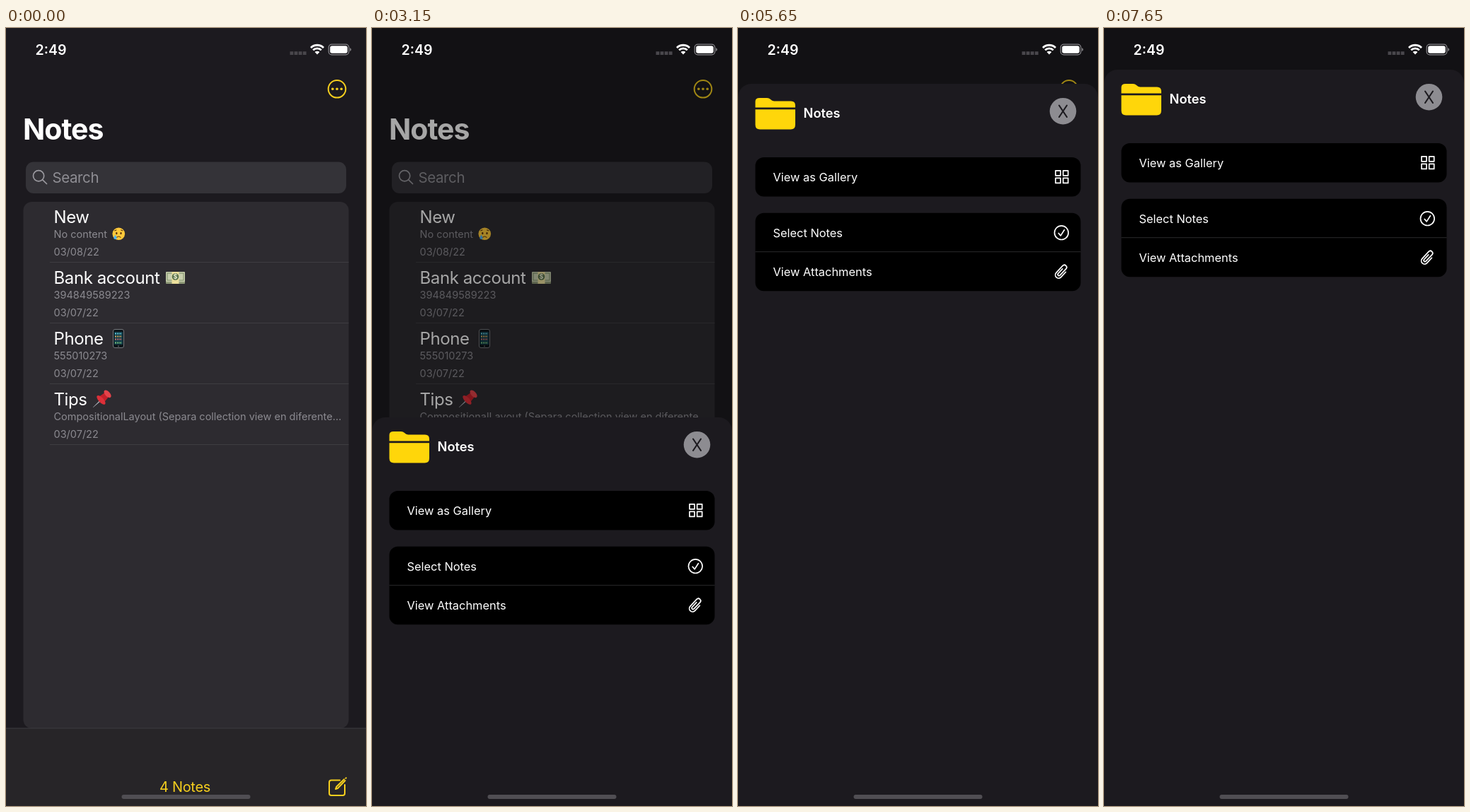
An HTML page for the animation above (8000 ms loop, 509 by 1101 pixels).

```html
<!DOCTYPE html>
<html lang="en">
<head>
<meta charset="utf-8">
<title>Notes sheet</title>
<style>
  html, body { margin: 0; width: 100%; height: 100%; overflow: hidden; background: #1c1a1f; }
  svg { display: block; width: 509px; height: 1101px; font-family: Inter, Roboto, sans-serif; fill: #fff; }
  .line { fill: none; stroke: #fff; stroke-width: 1.7; stroke-linecap: round; stroke-linejoin: round; }
  .accent { stroke: #f6cf1e; stroke-width: 2; }
  .name { font-size: 24px; letter-spacing: -.4px; }
  .small { font-size: 14.5px; fill: #8b8a90; }
  .item { font-size: 16.4px; }
</style>
</head>
<body>
<svg viewBox="0 0 509 1101">
  <g id="page">
    <rect width="509" height="1101" fill="#1c1a1f"/>
    <circle class="line accent" cx="468" cy="86.3" r="12.3"/>
    <g fill="#f6cf1e">
      <circle cx="461.8" cy="86.3" r="1.8"/><circle cx="468" cy="86.3" r="1.8"/><circle cx="474.2" cy="86.3" r="1.8"/>
    </g>
    <text x="24" y="158" font-size="41" font-weight="700" letter-spacing="-1">Notes</text>
    <rect x="28" y="189.5" width="453" height="44.5" rx="11" fill="#343338"/>
    <path class="line" style="stroke:#9a999f" d="M38.5 209.3a7.6 7.6 0 1 0 15.2 0a7.6 7.6 0 1 0-15.2 0M51.7 214.8L57.5 220.5"/>
    <text x="65.5" y="219" font-size="20.5" letter-spacing="-.4" fill="#8f8e94">Search</text>

    <rect x="24.5" y="246" width="460" height="745" rx="12" fill="#2d2b30"/>
    <g id="rows"></g>

    <!-- crying face -->
    <g transform="translate(159.3 291.3)">
      <circle r="8.8" fill="#fdc93b"/>
      <ellipse cx="-3" cy="-.8" rx="1.2" ry="1.8" fill="#5a3510"/><ellipse cx="3.2" cy="-.8" rx="1.2" ry="1.8" fill="#5a3510"/>
      <path d="M-3 5.3q3-3.2 6 0M-6-4.2l3-1.4M6-4.2l-3-1.4" fill="none" stroke="#5a3510" stroke-width="1.1"/>
      <path d="M-4.8 1.5q-4.4 6.2 0 6.2t0-6.2" fill="#4fb2f2"/>
    </g>
    <!-- banknotes -->
    <g transform="translate(226 345)">
      <rect y="1" width="27" height="16" rx="1" fill="#8f9a78"/>
      <rect width="27" height="14" rx="1" fill="#c8cfae"/>
      <rect x="2" y="2" width="23" height="10" fill="none" stroke="#7b8c67"/>
      <rect x="8.5" width="10" height="17" fill="#ebdf9c"/>
      <circle cx="13.5" cy="7" r="4.8" fill="#57704b"/>
      <text x="13.5" y="10.4" font-size="9" font-weight="700" text-anchor="middle" fill="#e9edcf">$</text>
    </g>
    <!-- handset -->
    <g transform="translate(151 426)">
      <rect x=".5" y=".5" width="15" height="26" rx="2.5" fill="#0c1418" stroke="#77787c"/>
      <rect x="2" y="4" width="12" height="18" fill="#123c49"/>
      <g fill="none" stroke-width="2" stroke-dasharray="2 1.2">
        <path d="M3 6.5h10" stroke="#63c7d8"/><path d="M3 10.5h10" stroke="#d8a558"/>
        <path d="M3 14.5h10" stroke="#c66a6a"/><path d="M3 19.5h10" stroke="#77bd74"/>
      </g>
      <circle cx="8" cy="24.3" r="1.1" fill="#55565a"/>
    </g>
    <!-- pushpin -->
    <g transform="translate(137 524) rotate(47)">
      <path d="M-.9 5h1.8l-.7 14h-.5z" fill="#a9adb3"/>
      <path d="M-4-7h8l1.3 9h-10.6z" fill="#c5202a"/>
      <ellipse cy="3.5" rx="8.2" ry="3.5" fill="#dc3039"/>
      <ellipse cy="-9" rx="6.5" ry="3.4" fill="#e5434a"/>
    </g>

    <rect y="991" width="509" height="110" fill="#272528"/>
    <path d="M0 991h509" stroke="#3d3c40"/>
    <text x="253" y="1081" font-size="20" letter-spacing="-.3" text-anchor="middle" fill="#f6cf1e">4 Notes</text>
    <path class="line accent" d="M472 1064.5H460a3 3 0 0 0-3 3V1083a3 3 0 0 0 3 3h16a3 3 0 0 0 3-3v-12M466 1077l1.2-3.2L478 1063.2M480.3 1061.8l.6-.6M466 1077l3-1L479.5 1065"/>
  </g>

  <rect id="dim" width="509" height="1101" fill="#000"/>

  <g id="sheet">
    <rect width="509" height="1150" rx="19" fill="#1c1a1f"/>
    <path fill="#ffd60a" d="M24.5 33.5V25q0-5 6-5H41q3 0 5 2t5 2.5H75q6 0 6 6v3zM24.5 36.2H81V58q0 6.5-6.5 6.5H31q-6.5 0-6.5-6.5z"/>
    <text x="92.5" y="48.2" font-size="18.3" font-weight="600">Notes</text>
    <circle cx="459.5" cy="38.7" r="18.8" fill="#8d8c91"/>
    <path d="M454 30.5l11 16.5M465 30.5l-11 16.5" class="line" style="stroke:#1c1a1f;stroke-width:2.1"/>
    <rect x="24.5" y="104" width="460" height="55.5" rx="12" fill="#000"/>
    <rect x="24.5" y="182.7" width="460" height="110.5" rx="12" fill="#000"/>
    <path d="M24.5 237.7h460" stroke="#2b2a2d"/>
    <text class="item" x="49.5" y="138">View as Gallery</text>
    <text class="item" x="49.5" y="216.5">Select Notes</text>
    <text class="item" x="49.5" y="271.8">View Attachments</text>
    <g class="line">
      <path d="M449 122.8h7v7h-7zM459.7 122.8h7v7h-7zM449 133.4h7v7h-7zM459.7 133.4h7v7h-7z"/>
      <circle cx="457.3" cy="210.7" r="9.8"/>
      <path d="M453.3 211.5l2.9 3.4 5.2-8.2"/>
      <path transform="translate(457.3 266) rotate(43)" d="M4.7-4V6a4.6 4.6 0 0 1-9.2 0V-7.5a3.2 3.2 0 0 1 6.4 0V5a1.8 1.8 0 0 1-3.6 0V-4"/>
    </g>
  </g>

  <g id="status">
    <text x="41.5" y="37.6" font-size="19.6" font-weight="600">2:49</text>
    <path d="M401.5 35.6h24" stroke="#49474c" stroke-width="4.6" stroke-dasharray="4.8 1.3"/>
    <g fill="none" stroke="#fff" stroke-width="2.8">
      <path d="M431 28a12.7 12.7 0 0 1 18 0M434.2 31.2a8.2 8.2 0 0 1 11.6 0"/>
    </g>
    <path d="M440 37.6l-3.4-3.5a4.8 4.8 0 0 1 6.8 0z"/>
    <rect x="456.2" y="23.2" width="28.6" height="14.6" rx="4.4" fill="none" stroke="#8a898d" stroke-width="1.2"/>
    <rect x="458.2" y="25.2" width="24.6" height="10.6" rx="2.8"/>
    <path d="M486.3 28v5q1.8-.7 1.8-2.5t-1.8-2.5" fill="#8a898d"/>
    <rect x="163.5" y="1085" width="182" height="6" rx="3" fill="#504e53"/>
  </g>
</svg>
<script>
const LOOP = 8000, STEP = 50, DIM = 0.35;
const HIDDEN = 1101, MEDIUM = 551, LARGE = 59;

const notes = [
  ['New', 'No content', '03/08/22'],
  ['Bank account', '394849589223', '03/07/22'],
  ['Phone', '555010273', '03/07/22'],
  ['Tips', 'CompositionalLayout (Separa collection view en diferente…', '03/07/22'],
];
document.getElementById('rows').innerHTML = notes.map(([name, body, date], i) => `
  <g transform="translate(0 ${i * 86})">
    <text class="name" x="67.5" y="276.3">${name}</text>
    <text class="small" x="67.5" y="296.5">${body}</text>
    <text class="small" x="67.5" y="322.2">${date}</text>
    <path d="M62 331.5h422.5" stroke="#3e3d41"/>
  </g>`).join('');

const linear = u => u;
const drag = u => u * u * (3 - 2 * u);
const slow = u => Math.sin(u * Math.PI / 2);
const spring = u => 1 - (1 + 9 * u) * Math.exp(-9 * u);

// [start, end, from, to, easing] for the top edge of the sheet
const moves = [
  [800, 1450, HIDDEN, MEDIUM, spring],
  [2300, 2700, MEDIUM, 321, drag],
  [2750, 3150, 321, MEDIUM, spring],
  [3650, 4140, MEDIUM, 223, drag],
  [4300, 4700, 223, LARGE, spring],
  [5600, 5650, LARGE, 79, linear],
  [5650, 5900, 79, 164, slow],
  [5950, 6350, 164, LARGE, spring],
  [6850, 7200, LARGE, 151, drag],
  [7300, 7650, 151, LARGE, spring],
];

function sheetTop(t) {
  let top = HIDDEN;
  for (const [start, end, from, to, ease] of moves) {
    if (t < start) break;
    top = t >= end ? to : from + (to - from) * ease((t - start) / (end - start));
  }
  return top;
}

const sheet = document.getElementById('sheet');
const dim = document.getElementById('dim');

function draw(now) {
  const t = Math.floor(now % LOOP / STEP) * STEP;
  const top = sheetTop(t);
  const shown = Math.min(1, (HIDDEN - top) / (HIDDEN - MEDIUM));
  sheet.setAttribute('transform', `translate(0 ${top.toFixed(2)})`);
  dim.setAttribute('opacity', DIM * shown);
}

const began = performance.now();
function tick() {
  draw(performance.now() - began);
  requestAnimationFrame(tick);
}
tick();
</script>
</body>
</html>
```
